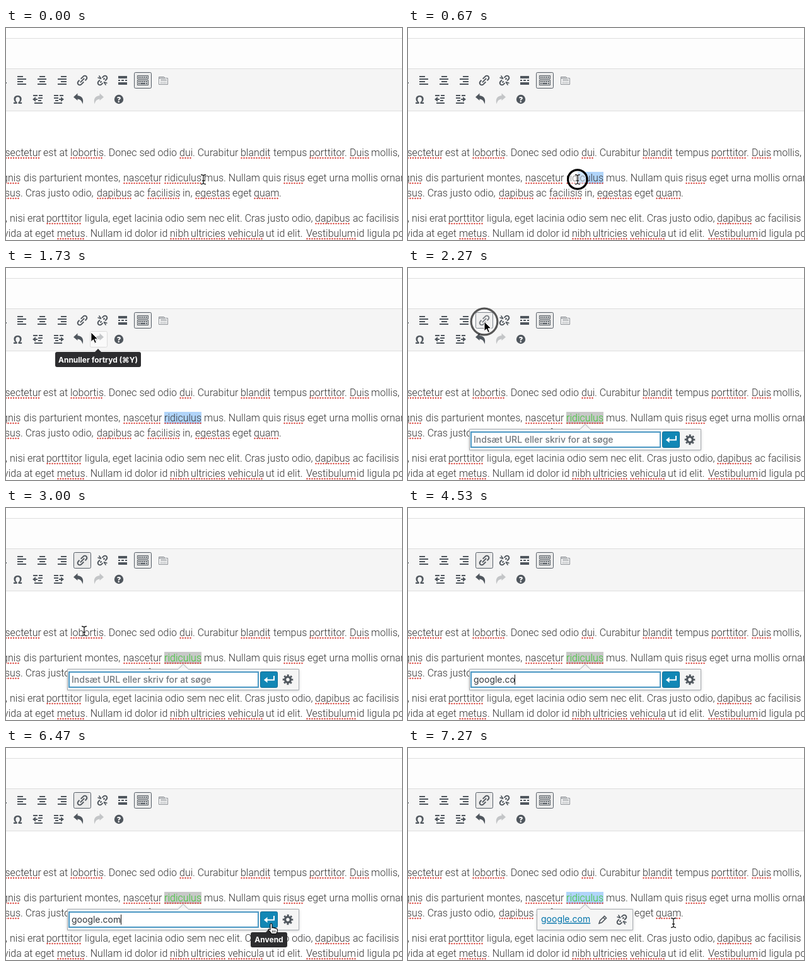
Write an HTML page that moves like this. It is 628x336 px and loops after 7.39 s.

```html
<!DOCTYPE html>
<html lang="da">
<head>
<meta charset="utf-8">
<title>Link editor</title>
<style>
html, body { margin: 0; width: 100%; height: 100%; overflow: hidden; background: #fff; }
svg { display: block; width: 628px; height: 336px; }
text { white-space: pre; }
#copy text { font: 300 16px Roboto, sans-serif; fill: #333; }
#copy path { stroke: #da463f; stroke-width: 2.4; stroke-linecap: round; stroke-dasharray: 0 4; }
.ui { font: 400 14px Inter, sans-serif; fill: #32373c; }
.tip text { font: 700 12px Inter, "DejaVu Sans", "Noto Sans CJK JP", sans-serif; fill: #fff; }
.tip path { fill: #2d2d2f; }
.popup { filter: drop-shadow(0 1px 2px rgba(0, 0, 0, .18)); }
.panel { fill: #f5f5f5; stroke: #a6abb0; }
.line { fill: none; stroke: #50575e; stroke-width: 2; }
.thin { fill: none; stroke: #50575e; stroke-width: 1; }
.solid { fill: #50575e; }
.pressed { fill: #ebebeb; stroke: #555d66; }
.hover { fill: #fafafa; stroke: #dcdcdc; }
</style>
</head>
<body>
<svg viewBox="0 0 628 336" xmlns="http://www.w3.org/2000/svg">
  <defs>
    <g id="chain" class="line" transform="rotate(-45)">
      <path d="M0 -3.3H5.7A3.3 3.3 0 0 1 5.7 3.3H3M0 3.3H-5.7A3.3 3.3 0 0 1 -5.7 -3.3H-3"/>
      <path d="M-3.700 0H3.700" stroke-linecap="round"/>
    </g>
    <g id="unchain" class="line">
      <path transform="rotate(-45)" d="M2.500 -3.3H5.7A3.3 3.3 0 0 1 5.7 3.3H2.500M-2.500 3.3H-5.7A3.3 3.3 0 0 1 -5.7 -3.3H-2.500M2 0H5M-5 0H-2"/>
      <path d="M-7.500 -4.500L-2 -2.500M-5.500 -7.500L-2 -2.500M7.500 4.500L2 2.500M5.500 7.500L2 2.500" stroke-width="1.5"/>
    </g>
    <g id="back">
      <path d="M-8 -3.500L-1.500 -9.500V2Z"/>
      <path d="M-3 -6C5 -6 9 -1 6.500 7.500C5 1.500 2 -.500 -3 -.500Z"/>
    </g>
    <path id="beamLine" d="M-4 -7.500Q0 -7.500 0 -5Q0 -7.500 4 -7.500M0 -5V5M-4 7.500Q0 7.500 0 5Q0 7.500 4 7.500M-2 2H2"/>
  </defs>

  <path fill="#fdfdfd" d="M0 17H628V64H0Z"/>
  <path fill="#f5f5f5" d="M0 65H628V131H0Z"/>
  <path stroke="#dedede" d="M0 16.5H628M0 64.5H628M0 131.5H628"/>

  <rect id="linkBox" x="107.5" y="70.5" width="27" height="25" rx="2"/>
  <rect id="redoBox" class="hover" x="133.5" y="100.5" width="27" height="25" rx="2"/>
  <rect class="pressed" x="203.5" y="70.5" width="27" height="25" rx="2"/>
  <g id="aligns" class="line"><path d="M-1 87H1"/></g>
  <g transform="translate(121 83)"><use href="#chain"/></g>
  <g transform="translate(153 83)"><use href="#unchain"/></g>
  <path class="solid" d="M178 76H192V80H178ZM178 82H181V84H178ZM183 82H187V84H183ZM189 82H192V84H189ZM178 86H192V90H178Z"/>
  <g class="thin">
    <path d="M208.500 75.500H225.500V80.500H208.500ZM208.500 82.500H225.500V90.500H208.500Z"/>
    <path d="M210 78H224M210 85H224" stroke-width="2" stroke-dasharray="2 1"/>
    <path d="M210 88H212M213 88H221M222 88H224" stroke-width="2"/>
  </g>
  <g fill="none" stroke="#8b8f94">
    <path fill="#fff" d="M242.500 89.500V77.500H250.500L252.500 79.500H256.500V89.500Z"/>
    <path d="M243 79.500H252M245 82.500H255" stroke-width="1.5"/>
    <path d="M245 85.500H255M245 87.500H255" stroke-dasharray="2 1"/>
  </g>
  <text x="11.500" y="119.500" class="solid" style="font:700 18px 'Open Sans',sans-serif">Ω</text>
  <g class="line">
    <path d="M43 107H50M52 107H58M51 111H58M51 115H56M45 119H58M76 107H83M85 107H91M76 111H83M78 115H83M76 119H89"/>
    <path d="M50 113H46M84 113H88"/>
  </g>
  <path class="solid" d="M42 113L47 109V117ZM92 113L87 109V117Z"/>
  <use href="#back" class="solid" x="115" y="113"/>
  <use href="#back" fill="#c3c5c7" transform="translate(147 113) scale(-1 1)"/>
  <circle class="solid" cx="179" cy="113" r="7.2"/>
  <text x="179" y="117.500" text-anchor="middle" fill="#fff" style="font:800 12px 'Open Sans',sans-serif">?</text>

  <rect id="selection" y="228" height="19"/>
  <g id="copy"></g>

  <g id="editor" class="popup">
    <path class="panel" d="M97.500 255.500H273L281 247.500L289 255.500H464.500V288.500H97.500Z"/>
    <rect x="100" y="260" width="300" height="24" fill="#fff" stroke="#4b98c4" stroke-width="2"/>
    <text id="field" class="ui" x="104" y="277"></text>
    <path id="caret" stroke="#111" d="M0 264V280"/>
    <rect x="403.500" y="259.500" width="27" height="25" rx="2" fill="#1287b5" stroke="#0b6a94"/>
    <path d="M425 266V272.500H413" fill="none" stroke="#fff" stroke-width="2"/>
    <path d="M409 272.500L414.500 268V277Z" fill="#fff"/>
    <g class="line" transform="translate(447 272) rotate(-11.25)">
      <circle r="4.400" style="stroke-width:3.400"/>
      <circle r="7" stroke-dasharray="2.750 2.750" style="stroke-width:2.600"/>
    </g>
  </g>
  <g id="preview" class="popup">
    <path class="panel" d="M204.500 255.500H273L281 247.500L289 255.500H356.500V288.500H204.500Z"/>
    <text class="ui" x="211" y="276" style="fill:#0073aa;text-decoration:underline">google.com</text>
    <path class="line" d="M303 278L304.500 273.500L311.500 266.500L314.500 269.500L307.500 276.500ZM309.500 268.500L312.500 271.500" style="stroke-width:1.600"/>
    <g transform="translate(339 272)"><use href="#unchain"/></g>
  </g>

  <g id="redoTip" class="tip">
    <path d="M80 133H141L146 128L151 133H211Q214 133 214 136V154Q214 157 211 157H81Q78 157 78 154V136Q78 133 81 133Z"/>
    <text x="146" y="149.500" text-anchor="middle">Annuller fortryd (⌘Y)</text>
  </g>
  <g id="applyTip" class="tip">
    <path d="M391 292H412L417 287L422 292H443Q446 292 446 295V313Q446 316 443 316H391Q388 316 388 313V295Q388 292 391 292Z"/>
    <text x="417" y="308" text-anchor="middle">Anvend</text>
  </g>

  <g id="pointer">
    <circle id="ring" fill="#fff" fill-opacity=".4" stroke="#000" stroke-width="3.200"/>
    <g id="beam" fill="none">
      <use href="#beamLine" stroke="#fff" stroke-width="2.600"/>
      <use href="#beamLine" stroke="#222" stroke-width="1.300"/>
    </g>
    <path id="arrow" d="M0 0V15L3.500 11.700L6 17.300L8.500 16.200L6 10.800H10.800Z" fill="#000" stroke="#fff"/>
    <g id="hand">
      <path d="M-2 0Q-2 -2 -.500 -2Q1 -2 1 0V5Q3 3.500 4 5.500Q6 4.500 7 6.500Q9.500 6 9.500 8.500Q9.500 11.500 7.500 14.500H0Q-2 11 -5 8.500Q-5 6 -2 8Z" fill="#fff" stroke="#000" stroke-width="1.100"/>
      <path d="M1.500 9V12.500M3.700 9V12.500M5.900 9V12.500" stroke="#000" stroke-width=".8"/>
    </g>
  </g>
</svg>
<script>
const LOOP = 7390;
const $ = id => document.getElementById(id);
const draw = (parent, tag, attrs) => {
  const el = document.createElementNS('http://www.w3.org/2000/svg', tag);
  for (const key in attrs) el.setAttribute(key, attrs[key]);
  return parent.appendChild(el);
};
const set = (id, attrs) => { for (const key in attrs) $(id).setAttribute(key, attrs[key]); };
const show = (id, on) => { $(id).style.display = on ? '' : 'none'; };

// Each run is "x|text"; an asterisk marks a misspelt word.
const copy = {
  203: ['-1.5|*sectetur', '59|est at', '102|*lobortis', '155|. Donec sed odio', '275|*dui', '296|. Curabitur',
    '372|*blandit', '424|tempus', '481|*porttitor', '537|.', '545|*Duis', '579|mollis,'],
  243: ['-6|*gnis', '28|dis parturient montes,', '186|*nascetur', '251|*ridiculus', '314|mus. Nullam quis',
    '440|*risus', '478|eget urna mollis ornare'],
  267: ['-2|*sus', '23|. Cras justo odio,', '144|*dapibus', '203|ac', '224|*facilisis', '280|in,',
    '300|*egestas', '359|eget', '393|*quam', '433|.'],
  307: ['-1|,', '6|nisi erat', '64|*porttitor', '125|ligula, eget lacinia odio sem nec elit. Cras justo odio,',
    '490|*dapibus', '550|ac facilisis'],
  331: ['-4|vida at eget', '81|*metus', '126|. Nullam id dolor id', '260|*nibh', '293|*ultricies',
    '352|*vehicula', '412|ut id elit.', '476|*Vestibulum', '556|id ligula porta']
};
let linkWord;
for (const y in copy) for (const run of copy[y]) {
  const [x, raw] = run.split('|');
  const word = raw.replace('*', '');
  const el = draw($('copy'), 'text', { x, y });
  el.textContent = word;
  if (word === 'ridiculus') linkWord = el;
  if (raw !== word) draw($('copy'), 'path', { d: `M${+x + 1.5} ${+y + 3}h${el.getComputedTextLength() - 2}` });
}

// Alignment icons: short and long rows, shifted by 0, half or all of the spare width.
[18, 50, 82].forEach((x, i) => [77, 81, 85, 89].forEach((y, row) => {
  const width = row % 2 ? 14 : 9;
  draw($('aligns'), 'path', { d: `M${x + Math.round((14 - width) * i / 2)} ${y}h${width}` });
}));

// Pointer track: time, x, y.
const track = [
  [0, 313, 240], [270, 313, 240], [400, 310, 240], [670, 269, 240], [830, 250, 240], [1100, 250, 240],
  [1600, 152, 120], [1730, 135, 102], [1900, 121, 85], [2470, 121, 85], [2930, 124, 195],
  [5000, 124, 195], [5300, 250, 238], [5700, 418, 276], [5950, 421, 280], [6740, 421, 280], [7000, 421, 277]
];
const clicks = [[380, 930], [2100, 2200], [6540, 6640]];
const FADE = 200;

function locate(t) {
  const next = track.findIndex(k => k[0] > t);
  if (next < 0) return track[track.length - 1].slice(1);
  const a = track[next - 1], b = track[next];
  const p = (t - a[0]) / (b[0] - a[0]);
  const eased = p * p * (3 - 2 * p);
  return [1, 2].map(i => a[i] + (b[i] - a[i]) * (b[0] - a[0] > 300 ? eased : p));
}

function pointerShape(t, y) {
  if (t > 5550 && t < 6740) return 'hand';
  return y < 132 ? 'arrow' : 'beam';
}

function render(t) {
  const [x, y] = locate(t);
  const linked = t >= 2270, applied = t >= 6740;

  const from = t < 400 ? 310 : t < 830 ? Math.max(251, x) : 251;
  set('selection', { x: from, width: 310 - from, fill: linked && !applied ? '#c8c8c8' : '#b0d4fa' });
  linkWord.style.fill = linked ? '#35c42e' : '';

  const overLink = x < 134 && y < 97 && t > 1700;
  show('linkBox', linked || overLink);
  set('linkBox', { class: linked ? 'pressed' : 'hover' });
  const overRedo = t >= 1600 && t < 1810;
  show('redoBox', overRedo);
  show('redoTip', overRedo);

  show('editor', linked && !applied);
  show('preview', applied);
  const count = Math.max(0, Math.min(10, Math.floor((t - 3600) / 115) + 1));
  const field = $('field');
  field.textContent = count ? 'google.com'.slice(0, count) : 'Indsæt URL eller skriv for at søge';
  field.style.fill = count ? '' : '#72777c';
  field.style.fontWeight = count ? '' : 500;
  const typing = t >= 3600 && t < 5000;
  show('caret', typing || (count ? t % 1000 < 500 : t % 1000 >= 500));
  const end = linked && !applied && count ? field.getComputedTextLength() : 0;
  set('caret', { transform: `translate(${Math.floor(104 + end) + .5} 0)` });
  show('applyTip', t >= 5740 && !applied);

  set('pointer', { transform: `translate(${x} ${y})` });
  show('pointer', t < 3500 || t >= 5000);
  const shape = pointerShape(t, y);
  for (const id of ['beam', 'arrow', 'hand']) show(id, id === shape);
  const click = clicks.find(([down, up]) => t >= down && t < up + FADE);
  show('ring', click);
  if (click) {
    const p = Math.max(0, (t - click[1]) / FADE);
    set('ring', { r: 15.2 + 16 * p, opacity: 1 - p });
  }
}

const start = performance.now();
function tick() {
  render((performance.now() - start) % LOOP);
  requestAnimationFrame(tick);
}
tick();
</script>
</body>
</html>
```
